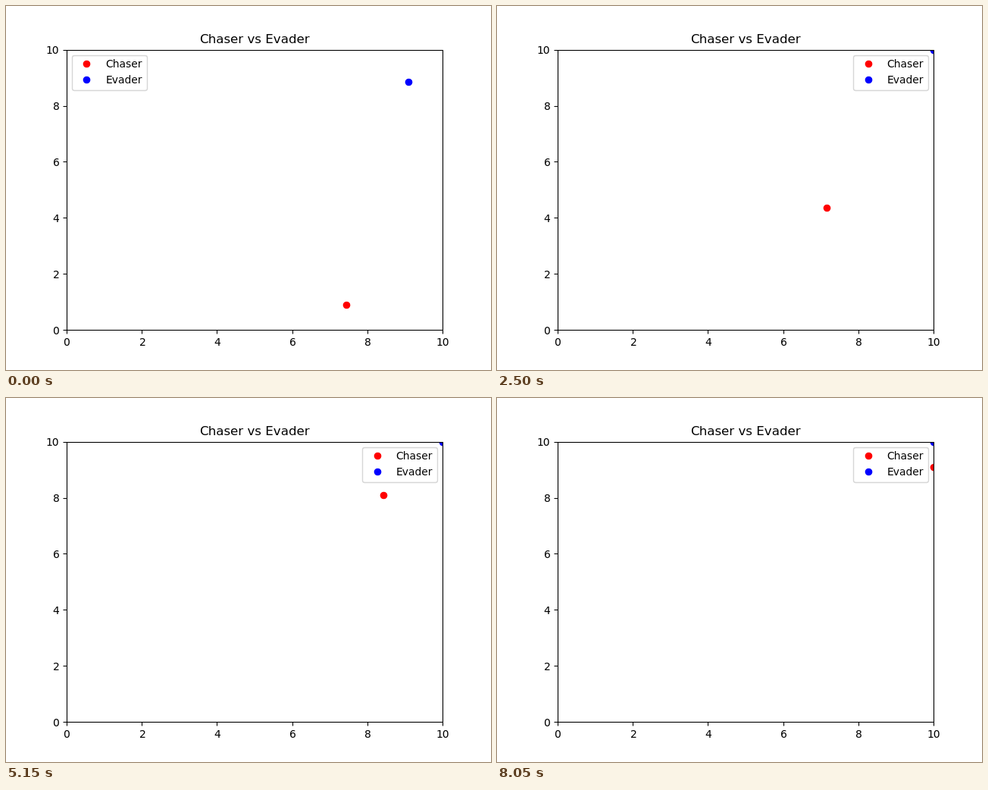
These frames come from a looping animation (640x480 px, 8100 ms). An HTML page with a canvas:

```html
<!DOCTYPE html>
<html lang="en">
<head>
<meta charset="utf-8">
<title>Chaser vs Evader</title>
<style>
html, body { margin: 0; width: 100%; height: 100%; overflow: hidden; background: #fff; }
canvas { display: block; width: 640px; height: 480px; }
</style>
</head>
<body>
<canvas id="stage" width="640" height="480"></canvas>
<script>
const ctx = document.getElementById('stage').getContext('2d');
const STEP = 50, STEPS = 162;
const LEFT = 80, RIGHT = 576, TOP = 58, BOTTOM = 427;
const FONT = '"DejaVu Sans", sans-serif';
const RED = '#ff0000', BLUE = '#0000ff';
const SMALL = 13.889, LARGE = 16.667, EM = 2048;

// Turning points of the chase: step, x, y
const turns = [
  [0, 449, 394], [22, 346, 345], [35, 430, 296], [51, 436, 264],
  [58, 403, 232], [66, 433, 197], [79, 493, 128], [88, 472, 120],
  [97, 500, 104], [103, 498, 128], [114, 571, 148], [130, 536, 131],
  [154, 570, 117], [161, 576, 91]
];

const mix = (a, b, k) => a + (b - a) * k;

// Seeded noise in -1..1
function noise(seed) {
  const v = Math.sin(seed * 12.9898) * 43758.5453;
  return (v - Math.floor(v)) * 2 - 1;
}

// Straight runs between turns, with a small tremble that fades at each turn
function chaserAt(n) {
  const i = Math.max(1, turns.findIndex(t => t[0] >= n));
  const [n0, x0, y0] = turns[i - 1], [n1, x1, y1] = turns[i];
  const k = (n - n0) / (n1 - n0);
  const sway = 2 * Math.sin(Math.PI * k);
  return [
    Math.round(mix(x0, x1, k) + sway * noise(n + 1)),
    Math.round(mix(y0, y1, k) + sway * noise(n + 500))
  ];
}

// Runs to the corner and stays there
function evaderAt(n) {
  const k = Math.min(1, n / 9);
  return [Math.round(mix(531, RIGHT, k)), Math.round(mix(100, TOP, k))];
}

function dot(x, y, color) {
  ctx.fillStyle = color;
  ctx.beginPath();
  ctx.arc(x + 0.5, y + 0.5, 4.86, 0, Math.PI * 2);
  ctx.fill();
}

// Sets text on whole pixels; align is 0 for left, 0.5 for centre, 1 for right
function text(str, x, y, size, align) {
  const first = str[0], scale = size / EM;
  ctx.font = EM + 'px ' + FONT;
  const { width, actualBoundingBoxLeft } = ctx.measureText(first);
  const bearing = Math.round(-actualBoundingBoxLeft * scale * 16) / 16;
  const origin = x - ctx.measureText(str).width * scale * align;
  const ink = Math.round(origin + bearing);
  ctx.font = size + 'px ' + FONT;
  ctx.fillStyle = '#000';
  ctx.fillText(first, ink - Math.floor(bearing), y);
  ctx.fillText(str.slice(1), ink - Math.ceil(bearing) + width * scale, y);
}

function line(x0, y0, x1, y1) {
  ctx.beginPath();
  ctx.moveTo(x0, y0);
  ctx.lineTo(x1, y1);
  ctx.stroke();
}

function axes() {
  ctx.strokeStyle = '#000';
  ctx.lineWidth = 1.11;
  for (let v = 0; v <= 10; v += 2) {
    const px = 80 + v * 49.6, py = 427.2 - v * 36.96;
    const x = Math.round(px) + 0.5, y = Math.round(py) + 0.5;
    line(x, 427.5, x, 432.5);
    line(75.5, y, 80.5, y);
    text(String(v), px, 448, SMALL, 0.5);
    text(String(v), 70.28, Math.round(py + 5.5), SMALL, 1);
  }
  ctx.strokeRect(80.5, 58.5, 496, 369);
  text('Chaser vs Evader', 328, 49, LARGE, 0.5);
}

function legend(onLeft) {
  const x = onLeft ? 86.94 : 470.24;
  ctx.beginPath();
  ctx.roundRect(Math.round(x) + 0.5, 65.5, 99, 46, 2.78);
  ctx.fillStyle = 'rgba(255,255,255,0.8)';
  ctx.fill();
  ctx.strokeStyle = 'rgba(204,204,204,0.8)';
  ctx.lineWidth = 1.39;
  ctx.stroke();
  const entry = (name, color, y) => {
    dot(Math.round(x + 19.45), y, color);
    text(name, x + 44.45, y + 5, SMALL, 0);
  };
  entry('Chaser', RED, 76);
  entry('Evader', BLUE, 97);
}

// The legend leaves the right corner while a dot sits under it
const underLegend = ([x, y]) => x > 470 && x < 569.5 && y > 64.5 && y < 111;

function draw(n) {
  const chaser = chaserAt(n), evader = evaderAt(n);
  ctx.fillStyle = '#fff';
  ctx.fillRect(0, 0, 640, 480);
  ctx.save();
  ctx.beginPath();
  ctx.rect(LEFT, TOP, RIGHT - LEFT, BOTTOM - TOP);
  ctx.clip();
  dot(...chaser, RED);
  dot(...evader, BLUE);
  ctx.restore();
  axes();
  legend(underLegend(chaser) || underLegend(evader));
}

const start = performance.now();
function tick() {
  draw(Math.floor((performance.now() - start) / STEP) % STEPS);
  requestAnimationFrame(tick);
}
tick();
</script>
</body>
</html>
```
